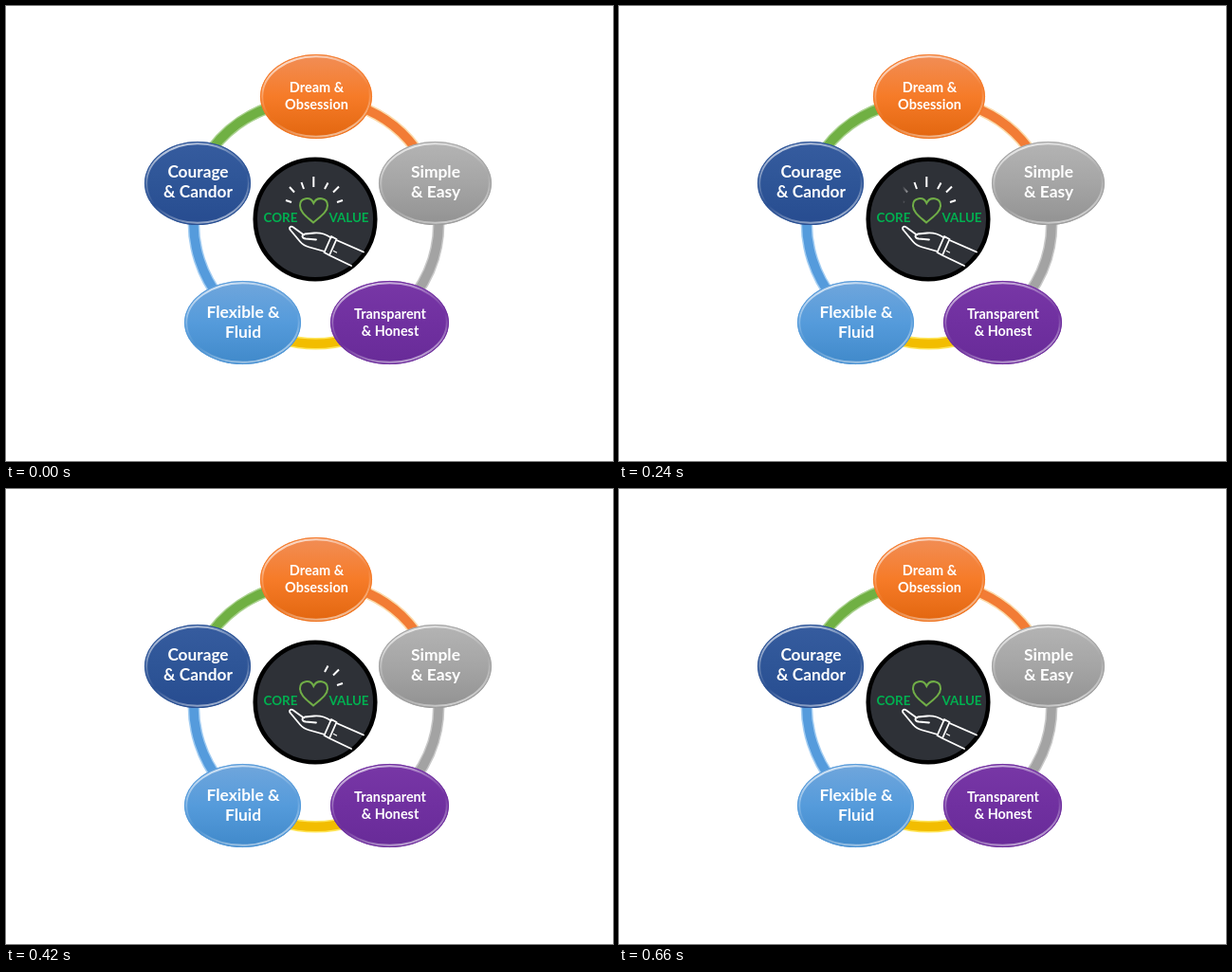
Animation, 640 px wide and 480 px high, one loop 990 ms. Source, as an HTML page:

```html
<!DOCTYPE html>
<html lang="en">
<head>
<meta charset="utf-8">
<title>Core value</title>
<style>
  html, body { margin: 0; width: 100%; height: 100%; overflow: hidden; background: #fff; }
  svg { display: block; }
  text { font-family: Lato, "Open Sans", sans-serif; font-weight: 700; text-anchor: middle; }
</style>
</head>
<body>
<svg width="640" height="480" viewBox="0 0 640 480" fill="none">
  <defs>
    <linearGradient id="wipe" gradientUnits="userSpaceOnUse" x1="-5" y1="0" x2="5" y2="0">
      <stop stop-color="#fff" stop-opacity="0"/>
      <stop offset="1" stop-color="#fff"/>
    </linearGradient>
    <linearGradient id="gloss" x1=".2" y1="0" x2=".65" y2="1">
      <stop stop-color="#fff" stop-opacity=".75"/>
      <stop offset=".35" stop-color="#fff" stop-opacity=".25"/>
      <stop offset=".6" stop-color="#fff" stop-opacity="0"/>
      <stop offset="1" stop-color="#fff" stop-opacity=".55"/>
    </linearGradient>
  </defs>
  <g id="ring"></g>
  <g id="bubbles"></g>
  <circle cx="326" cy="225" r="63.3" fill="#2e3137" stroke="#000" stroke-width="4.5"/>
  <path d="M324 228.5C318 223 310 218 310 210.5C310 202 321 200.500 324.300 208C328 200.500 339 202 339 210.500C339 218 330 223 324 228.500Z" stroke="#70ad47" stroke-width="2"/>
  <g stroke="#fff" stroke-width="1.8" stroke-linecap="round" stroke-linejoin="round">
    <path d="M342 244C336 240 331 239 325 239.500L315 240.500C311 241.500 312 245 316 245.500L327 246.500"/>
    <path d="M314 241.500L303 233.500C300 231.500 297.500 234 300 236.500L310 248.500C313 252 316 253.500 320 254.500L336 259"/>
    <path d="M343 243L348.500 246L341 263L335.500 260ZM348.500 247L377 259.500M341 263L364 274"/>
    <path d="M345.500 258.500L348.500 260" stroke-width="1.3"/>
  </g>
  <path d="M295 205L301 207M299 191L304 196.500M311.500 186L314 193M324.300 180V191M336 193L339.500 186.500M345 196.500L351 190.500M349 207L355 205" stroke="url(#wipe)" stroke-width="2"/>
  <g fill="#00b050" font-size="13.400">
    <text x="289.500" y="228">CORE</text>
    <text x="361.500" y="228">VALUE</text>
  </g>
</svg>
<script>
const el = id => document.getElementById(id);

// Ring segments: ends, edge tint, body colour
const arcs = [
  [217, 151, 278, 107, "#a9d18e", "#70b043"],
  [372, 106, 437, 158, "#fbd9a8", "#f27c35"],
  [456, 222, 432, 304, "#c8c8c8", "#a3a3a3"],
  [366, 350, 290, 351, "#ffe65c", "#f2bd00"],
  [226, 309, 198, 222, "#a3cdf2", "#559bdc"]
];
el("ring").innerHTML = arcs.map(([x1, y1, x2, y2, edge, body]) => {
  const d = `M${x1} ${y1}A129 129 0 0 1 ${x2} ${y2}`;
  return `<path d="${d}" stroke="${edge}" stroke-width="12.5"/><path d="${d}" stroke="${body}" stroke-width="9.5"/>`;
}).join("");

// Bubbles: centre, radii, top / middle / bottom colours, font size, first baseline, leading, lines
const bubbles = [
  [327, 95.5, 59, 44.5, "#f18e57", "#f67b28", "#e2660f", 14.5, 91, 18, "Dream &amp;", "Obsession"],
  [452.5, 187, 59.5, 44, "#b4b4b4", "#a5a5a5", "#929292", 17.4, 181, 21, "Simple", "&amp; Easy"],
  [404.5, 334, 62.5, 44, "#7837a6", "#7030a0", "#682b98", 14.4, 330, 18, "Transparent", "&amp; Honest"],
  [249.5, 334, 61.5, 44, "#70a6dc", "#559bdb", "#4089ca", 17.4, 329, 21, "Flexible &amp;", "Fluid"],
  [202, 187, 56, 44, "#365c9f", "#2e5597", "#274c90", 17.3, 181, 21, "Courage", "&amp; Candor"]
];
el("bubbles").innerHTML = bubbles.map(([x, y, rx, ry, top, mid, low, size, base, leading, ...lines], i) => {
  const oval = (inset, paint) => `<ellipse cx="${x}" cy="${y}" rx="${rx - inset}" ry="${ry - inset}" ${paint}/>`;
  return `<linearGradient id="fill${i}" x1="0" y1="0" x2="0" y2="1">
      <stop stop-color="${top}"/><stop offset=".5" stop-color="${mid}"/><stop offset="1" stop-color="${low}"/>
    </linearGradient>` +
    oval(0, `fill="url(#fill${i})"`) +
    oval(2.2, `stroke="url(#gloss)" stroke-width="2"`) +
    oval(.4, `stroke="${mid}" stroke-width=".8"`) +
    lines.map((line, n) =>
      `<text x="${x + .5}" y="${base + n * leading}" font-size="${size}" fill="#fff">${line}</text>`).join("");
}).join("");

// The rays are wiped away from left to right in 60 ms steps
const LOOP = 990, STEP = 60, WIPE_END = 660;
function draw() {
  const t = Math.min(performance.now() % LOOP, WIPE_END);
  const edge = 268 + 0.15 * Math.floor(t / STEP) * STEP;
  el("wipe").setAttribute("gradientTransform", `translate(${edge})`);
  requestAnimationFrame(draw);
}
draw();
</script>
</body>
</html>
```
